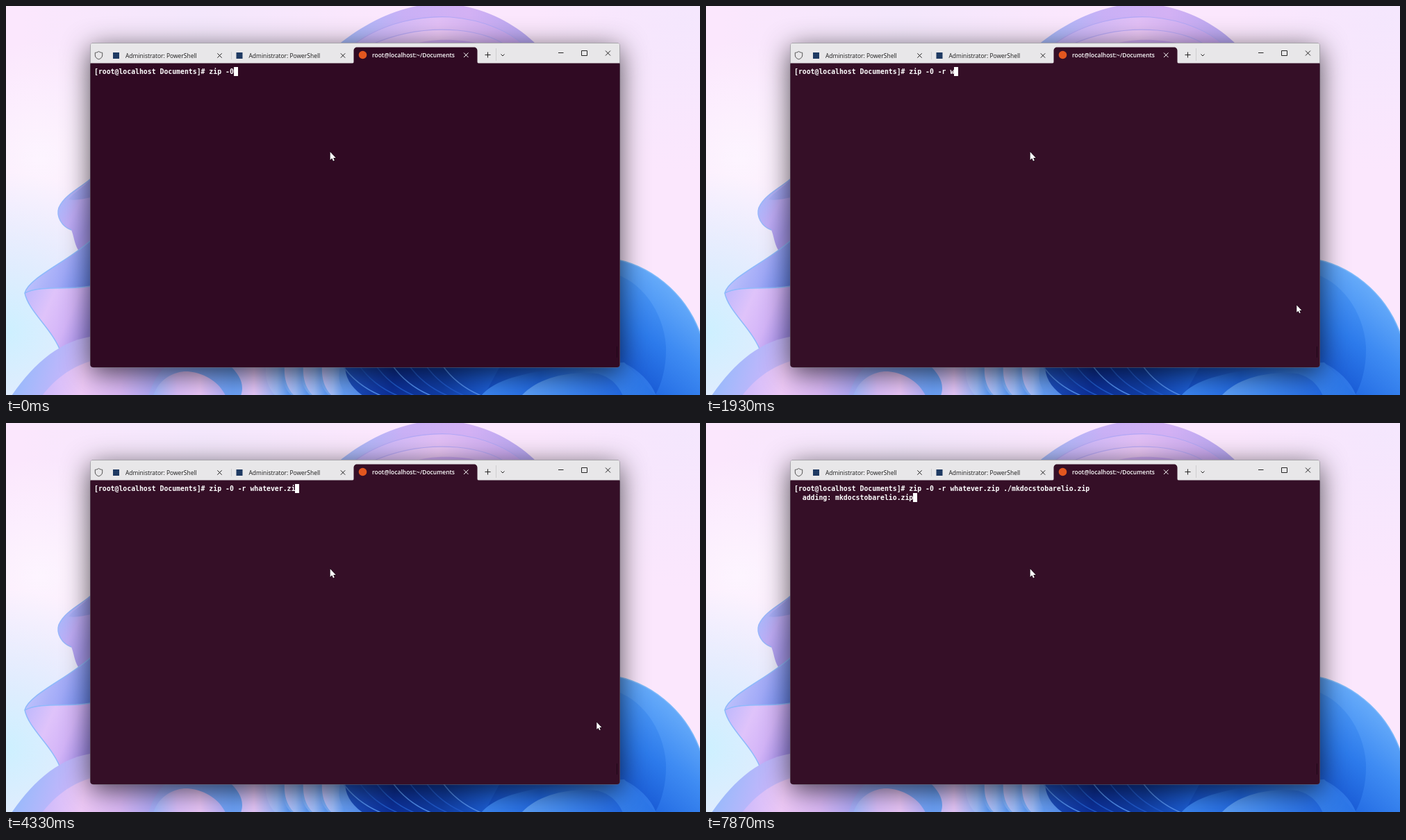
An HTML page with a canvas that plays this animation: 999x561 px, repeating every 8000 ms.

```html
<!DOCTYPE html>
<html lang="en">
<head>
<meta charset="utf-8">
<title>Terminal</title>
<style>
html, body { margin: 0; width: 100%; height: 100%; overflow: hidden; background: #fbe7fd; }
canvas { display: block; }
</style>
</head>
<body>
<canvas id="stage" width="999" height="561"></canvas>
<script>
const W = 999, H = 561, LOOP = 8000;
const ctx = document.getElementById('stage').getContext('2d');
const scenery = document.createElement('canvas');
scenery.width = W;
scenery.height = H;
const bg = scenery.getContext('2d');

const PROMPT = '[root@localhost Documents]# ';
const COMMAND = 'zip -0 -r whatever.zip ./mkdocstobarelio.zip ';
const OUTPUT = '  adding: mkdocstobarelio.zip';
const ENTER = 7730;
const CELL = { x: 127, y: 88, w: 5.906, h: 12.7 };

// [time in ms, typed characters]
const KEYS = [
  [0, 6], [130, 7], [600, 8], [800, 9], [870, 10], [1930, 11],
  [2070, 12], [2130, 13], [2200, 14], [2470, 15], [2800, 14],
  [3000, 15], [3070, 16], [3200, 17], [3270, 18], [3470, 19],
  [3670, 20], [3800, 21], [4470, 22], [4600, 23], [5130, 24],
  [5930, 23], [6200, 24], [6330, 25], [6600, 26], [6730, 27],
  [6870, 28], [6930, 45]
];

function petal(path, [x0, y0, x1, y1], colors, edge) {
  const shape = new Path2D(path);
  const fill = bg.createLinearGradient(x0, y0, x1, y1);
  colors.forEach((color, i) => fill.addColorStop(i / (colors.length - 1), color));
  bg.fillStyle = fill;
  bg.fill(shape);
  if (edge) line(path, edge, 1.2);
}

function glow(x, y, r, rgb, alpha) {
  const g = bg.createRadialGradient(x, y, 0, x, y, r);
  g.addColorStop(0, `rgba(${rgb},${alpha})`);
  g.addColorStop(1, `rgba(${rgb},0)`);
  bg.fillStyle = g;
  bg.fillRect(0, 0, W, H);
}

function line(path, color, width = 1) {
  bg.strokeStyle = color;
  bg.lineWidth = width;
  bg.stroke(new Path2D(path));
}

function drawBackdrop() {
  bg.fillStyle = '#fbe7fd';
  bg.fillRect(0, 0, W, H);
  glow(280, 30, 260, '240,231,251', 0.7);
  glow(980, 20, 220, '240,230,253', 0.6);
  glow(50, 220, 170, '253,246,255', 0.9);
  glow(0, 470, 230, '205,240,255', 1);
}

function drawTopPetals() {
  petal('M478 56C520 22 570 -2 625 -4C680 -2 730 22 764 56Z',
    [480, 50, 760, 40], ['#a4bbfb', '#c9b0f6', '#d3b1f4', '#b5a6f1']);
  petal('M500 56C545 22 600 14 640 16C690 20 725 38 745 56Z',
    [500, 50, 745, 40], ['#c4b6fb', '#e2bff6', '#c6a6f0'], '#b3a8f6');
  petal('M525 56C570 36 615 32 650 35C680 38 705 46 718 56Z',
    [525, 50, 718, 50], ['#d6bdf9', '#ecc8f6', '#cbaaf1'], '#b8a8f4');
  petal('M585 56C610 47 650 46 690 56Z',
    [585, 50, 690, 50], ['#d6b2f4', '#c39df0']);
}

function drawLeftPetals() {
  petal('M122 249C108 262 84 272 76 291C72 303 80 318 94 323C98 332 98 342 104 352L122 362Z',
    [75, 285, 122, 310], ['#a9b8fc', '#c0adf7', '#ab9cf0']);
  petal('M122 249C112 262 96 270 90 279C100 281 112 278 122 276Z',
    [95, 265, 122, 275], ['#a9b0f8', '#9a98ea']);
  line('M122 249C108 262 84 272 76 291C72 303 80 318 94 323', '#98b8fb', 1.5);
  petal('M27 414C50 402 90 410 122 404V502H80C68 466 33 442 27 414Z',
    [30, 420, 122, 460], ['#c3bafc', '#dfc3fa', '#d3b4f8', '#a994f0']);
  petal('M27 414C32 392 90 368 122 338V404C90 409 50 403 27 414Z',
    [40, 380, 118, 410], ['#bcc0fc', '#a0a9f7', '#6a88ee']);
  line('M122 338C90 368 32 392 27 414C33 442 68 466 80 502M27 414C50 402 90 410 122 404', '#8fbafb', 1.5);
  petal('M8 562C40 515 80 480 130 476L260 500V562Z',
    [20, 520, 140, 560], ['#98bafb', '#c1b6fb', '#e4c4f8']);
  petal('M52 562C75 532 105 512 150 506L260 515V562Z',
    [55, 540, 220, 560], ['#cdbafb', '#eec9f7', '#dab8f6', '#a5a4f4']);
}

function drawBottomPetals() {
  petal('M205 562C212 540 220 528 235 515H890C912 526 928 542 936 562Z', [205, 540, 936, 540],
    ['#a9aef8', '#6ba0f6', '#7fb0f8', '#2b70e6', '#1450c8', '#2a70e4', '#2f78e8']);
  petal('M212 562C220 536 245 526 262 527C290 530 308 545 316 562Z',
    [214, 550, 312, 545], ['#a3b8fc', '#d9bdf9', '#e9c5f7', '#b5b0f8']);
  petal('M338 562C344 545 336 532 322 518H376C372 540 380 552 392 562Z',
    [328, 540, 386, 540], ['#bcbafb', '#e6c6f8', '#9cb4fa']);
  for (let i = 0; i < 4; i++) {
    const x = 388 + i * 27;
    petal(`M${x} 562C${x - 12} 550 ${x - 15} 535 ${x - 14} 518H${x + 13}C${x + 8} 535 ${x + 10} 550 ${x + 24} 562Z`,
      [x - 14, 540, x + 18, 540], ['#c2c2fb', '#9dbcfa', '#5f9bf5']);
  }
  petal('M488 518H712L688 562H514C496 550 488 535 488 518Z',
    [488, 520, 700, 562], ['#1f55c8', '#0c2f98', '#103ea6', '#1d60d8']);
  for (let i = 0; i < 7; i++) {
    const x = 484 + i * 24;
    line(`M${x} 518C${x + 14} 538 ${x + 32} 552 ${x + 56} 562`, i % 3 ? '#1f59cc' : '#4f8cec', 1.5);
  }
  petal('M684 562C705 536 760 522 890 514L936 562Z',
    [690, 550, 930, 530], ['#3b85f0', '#1f66e0', '#3a84ee', '#2a74e6']);
  petal('M742 562C765 536 810 526 850 530C870 534 882 548 888 562Z',
    [745, 550, 885, 545], ['#5c9ff7', '#3b84ef', '#2268e0']);
}

function drawRightPetals() {
  petal('M870 364C925 372 978 412 1000 474V562H870Z',
    [985, 410, 885, 530], ['#6fb2fb', '#3f8cf3', '#2169e2']);
  petal('M870 384C915 396 946 440 950 490C951 520 944 545 934 562H870Z',
    [955, 430, 883, 520], ['#4a96f5', '#2c7aeb', '#1a5cd6']);
  line('M870 364C925 372 978 412 1000 474', '#7cbafa', 1.5);
}

function drawFrame() {
  bg.save();
  bg.shadowColor = 'rgba(0,0,0,.68)';
  bg.shadowBlur = 38;
  bg.shadowOffsetY = 8;
  bg.fillStyle = '#6b666f';
  bg.beginPath();
  bg.roundRect(121, 53, 763, 468.5, 5);
  bg.fill();
  bg.restore();
  bg.fillStyle = '#e8e7e9';
  bg.beginPath();
  bg.roundRect(121.5, 53.5, 762, 30, [4, 4, 0, 0]);
  bg.fill();
}

function cross(x, y, r, color) {
  line(`M${x - r} ${y - r}L${x + r} ${y + r}M${x + r} ${y - r}L${x - r} ${y + r}`, color);
}

function drawTitleBar() {
  const ink = '#252525';
  bg.font = '8.47px "Open Sans", sans-serif';
  for (const x of [0, 177.5]) {
    bg.fillStyle = '#1f3a63';
    bg.fillRect(154 + x, 67, 9, 9);
    bg.fillStyle = '#1c1c1c';
    bg.fillText('Administrator: PowerShell', 172 + x, 75);
    cross(307.5 + x, 71.5, 3.2, ink);
  }
  line('M133.5 65.5C135.5 67 137 67.3 138.7 67.3V71C138.7 74 136.5 75.8 133.5 76.8C130.5 75.8 128.3 74 128.3 71V67.3C130 67.3 131.5 67 133.5 65.5Z', '#555');
  line('M324.5 66V77M705.5 61V79', '#cfced0');
  line('M689.5 70.5H697.5M693.5 66.5V74.5', ink);
  line('M712.5 69.5L715 72L717.5 69.5', ink);
  line('M795 67.5H802.5M828.5 64.5H836.5V71.5H828.5Z', ink);
  cross(866.5, 68, 3.5, ink);
}

function drawActiveTab(color) {
  ctx.fillStyle = color;
  ctx.fill(new Path2D('M498 83C500 83 500.5 82 500.5 80V64.5C500.5 61.5 502.5 59.5 505.5 59.5H673.5C676.5 59.5 678.5 61.5 678.5 64.5V80C678.5 82 679 83 681 83Z'));
  ctx.fillStyle = '#e2561f';
  ctx.beginPath();
  ctx.arc(513.5, 70.5, 5.8, 0, Math.PI * 2);
  ctx.fill();
  ctx.fillStyle = '#fff';
  ctx.font = '600 8.47px "Open Sans", sans-serif';
  ctx.fillText('root@localhost:~/Documents', 527, 74);
  ctx.strokeStyle = '#fff';
  ctx.lineWidth = 1;
  ctx.stroke(new Path2D('M659 67.5L665.5 74M665.5 67.5L659 74'));
}

function drawPointer(x, y, scale) {
  ctx.save();
  ctx.translate(x, y);
  ctx.scale(scale, scale);
  const arrow = new Path2D('M0 0V12L2.7 9.6L4.5 13.6L6.4 12.8L4.7 8.9H8.4Z');
  ctx.strokeStyle = '#1a0a16';
  ctx.lineWidth = 1.2;
  ctx.stroke(arrow);
  ctx.fillStyle = '#fff';
  ctx.fill(arrow);
  ctx.restore();
}

function drawRow(text, row) {
  [...text].forEach((ch, col) =>
    ctx.fillText(ch, CELL.x + col * CELL.w, CELL.y + row * CELL.h + 10));
}

function drawCaret(col, row) {
  ctx.fillRect(Math.round(CELL.x + col * CELL.w), Math.round(CELL.y + row * CELL.h), 6, 13);
}

function drawTerminal(t) {
  const color = t < 870 ? '#300a23' : '#350f27';
  ctx.fillStyle = color;
  ctx.beginPath();
  ctx.roundRect(121.5, 82.5, 762, 438.5, [0, 0, 4, 4]);
  ctx.fill();
  drawActiveTab(color);
  ctx.fillStyle = '#1f0617';
  ctx.fillRect(879, 491, 1, 16);

  const typed = KEYS.findLast(([time]) => time <= t)[1];
  const input = PROMPT + COMMAND.slice(0, typed);
  ctx.font = '700 9.81px "DejaVu Sans Mono", monospace';
  ctx.fillStyle = '#fff';
  drawRow(input, 0);
  if (t < ENTER) {
    drawCaret(input.length, 0);
  } else {
    drawRow(OUTPUT, 1);
    drawCaret(OUTPUT.length, 1);
  }
}

function render(t) {
  ctx.drawImage(scenery, 0, 0);
  drawTerminal(t);
  drawPointer(466.7, 210.5, 0.95);
  if (t >= 270 && t < 330) drawPointer(988, 548, 0.85);
  if (t >= 330 && t < 4400) drawPointer(850.3, 431.5, 0.85);
}

drawBackdrop();
drawTopPetals();
drawLeftPetals();
drawRightPetals();
drawBottomPetals();
drawFrame();
drawTitleBar();

const start = performance.now();
function tick() {
  render((performance.now() - start) % LOOP);
  requestAnimationFrame(tick);
}
tick();
</script>
</body>
</html>
```
